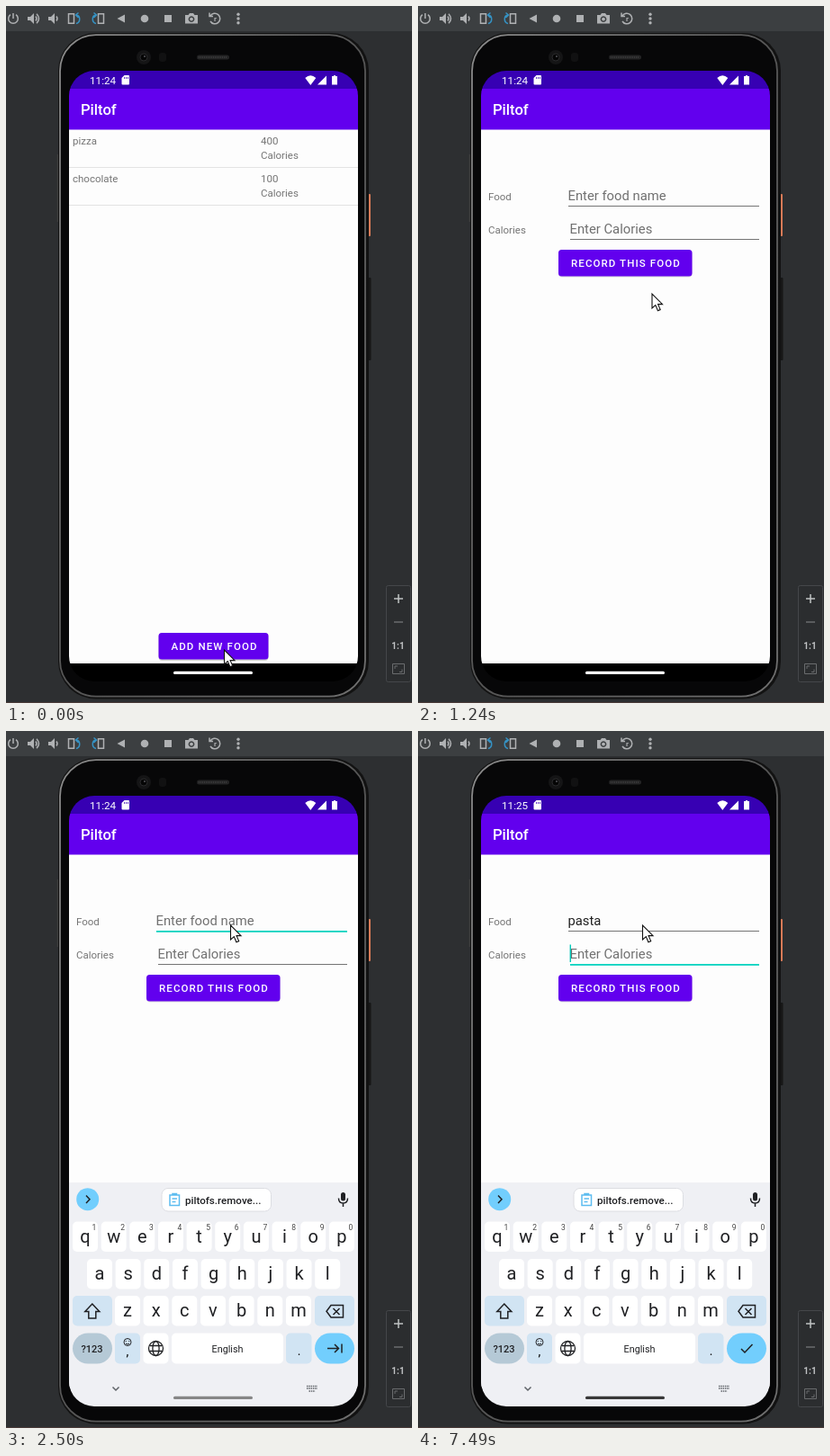
Animation, 451 px wide and 775 px high, one loop 8000 ms. Source, as an HTML page:

```html
<!DOCTYPE html>
<html lang="en">
<head>
<meta charset="utf-8">
<title>Food log</title>
<style>
html, body { margin: 0; width: 100%; height: 100%; overflow: hidden; background: #2d2f31; }
svg { display: block; width: 100vw; height: 100vh; }
text { font-family: Roboto, "Liberation Sans", sans-serif; white-space: pre; }
.body { font-size: 11.5px; fill: #757575; }
.field { font-size: 14.8px; fill: #707070; }
.btn { font-size: 11.5px; font-weight: 500; letter-spacing: 1.1px; fill: #fff; }
.key { font-size: 20px; fill: #202124; text-anchor: middle; }
.mid { text-anchor: middle; }
.line { fill: none; stroke-width: 1.5; }
</style>
</head>
<body>
<svg viewBox="0 0 451 775">
  <defs>
    <clipPath id="screen"><rect x="70" y="72" width="321" height="679" rx="28"/></clipPath>
    <clipPath id="page"><rect x="70" y="92" width="321" height="639"/></clipPath>
    <linearGradient id="rim" x2="1" y2="1">
      <stop offset="0" stop-color="#8c8c8c"/><stop offset=".5" stop-color="#555"/><stop offset="1" stop-color="#707070"/>
    </linearGradient>
    <path id="speaker" d="M-6-2h3l4-4v12l-4-4h-3z"/>
  </defs>

  <!-- emulator window -->
  <rect width="451" height="775" fill="#2d2f31"/>
  <rect width="451" height="28" fill="#3c3f41"/>
  <path d="M0 774.5h451" stroke="#4a3a38"/>
  <g fill="#afb1b3" stroke="#afb1b3" stroke-width="0">
    <path class="line" d="M5 9.7a5.3 5.3 0 1 0 6 0M8 8v6"/>
    <use href="#speaker" x="30" y="14"/>
    <path class="line" d="M33 11.5q2 2.5 0 5M34 8.7q5 5.3 0 10.6"/>
    <use href="#speaker" x="53" y="14"/>
    <path class="line" d="M56 11.5q2 2.5 0 5"/>
    <path class="line" d="M69.5 8.7h6v10.6h-6zM102.5 8.7h6v10.6h-6z"/>
    <path class="line" stroke="#3592c4" d="M78 19.5c5-1 5-9 0-9.5m2.5-2.5l-3 2.5 3 3M100 19.5c-5-1-5-9 0-9.5m-2.5-2.5l3 2.5-3 3"/>
    <path d="M132 9.5v9l-8.5-4.5zM176 10h8v8h-8z"/>
    <circle cx="154" cy="14" r="4.3"/>
    <path fill-rule="evenodd" d="M199 10h3.5l1.5-2h4l1.5 2h3.5v9.5h-14zM206 11.2a3.4 3.4 0 1 0 .01 0z"/>
    <circle cx="206" cy="14.6" r="1.9"/>
    <path class="line" d="M227 11a5.8 5.8 0 1 1 0 6M226 7.5v4h4"/>
    <text class="mid" x="232.5" y="17" font-size="8" font-weight="700">r</text>
    <circle cx="258" cy="9.3" r="1.7"/><circle cx="258" cy="14" r="1.7"/><circle cx="258" cy="18.7" r="1.7"/>
  </g>
  <rect x="422.5" y="644.5" width="27" height="107" rx="2" fill="#2b2d2f" stroke="#45474a"/>
  <path class="line" stroke="#c0c2c4" d="M431 659h10M436 654v10"/>
  <path class="line" stroke="#6a6c6e" d="M431 685h10"/>
  <text class="mid" x="435.5" y="714.5" font-size="10" font-weight="700" fill="#c0c2c4">1:1</text>
  <path fill="none" stroke="#6a6c6e" d="M429.5 731.5h13v11h-13zM432 737v-3h3M437 740.5h3v-3"/>

  <!-- phone -->
  <path d="M57.5 165v75" stroke="#3c3c3c" stroke-width="1.5"/>
  <rect x="402.5" y="209" width="2.5" height="47" rx="1" fill="#d87b58"/>
  <rect x="402.5" y="302" width="3" height="92" rx="1" fill="#171717"/>
  <rect x="58" y="30" width="345" height="740.5" rx="42" fill="#121212"/>
  <rect x="60" y="32.2" width="339" height="735.5" rx="40" fill="#070708" stroke="url(#rim)" stroke-width="1.8"/>
  <circle cx="153" cy="57" r="8" fill="#151516"/><circle cx="153" cy="57" r="4" fill="#050505" stroke="#29292b"/>
  <circle cx="154" cy="56" r="1" fill="#55555a"/>
  <rect x="170" y="52" width="8" height="10" rx="3" fill="#111112"/>
  <rect x="212" y="54.5" width="36" height="5" rx="2.5" fill="#242425"/>
  <path d="M214 57h32" stroke="#39393a" stroke-width="2" stroke-dasharray="1 1"/>

  <g clip-path="url(#screen)">
    <rect x="70" y="72" width="321" height="679" fill="#000"/>
    <rect x="70" y="72" width="321" height="20.5" fill="#3700b3"/>
    <rect x="70" y="92" width="321" height="46" fill="#6200ee"/>
    <rect x="70" y="137.5" width="321" height="593.5" fill="#fdfdfd"/>
    <text id="clock" x="93" y="87" font-size="11.7" fill="#fff"></text>
    <g fill="#fff">
      <path d="M131.5 77h4.5q1 0 1 1v8.5q0 1-1 1h-6.5q-1 0-1-1v-6.5z"/>
      <path d="M338.3 88l-6-8q6-5.500 12 0zM356 77.500v10h-10zM364 77h2v1h2v9.500h-6v-9.500h2z"/>
      <path d="M131.500 79v2M133.500 79v2M135.500 79v2" stroke="#3700b3" stroke-width=".8"/>
    </g>
    <g clip-path="url(#page)">
      <g id="list">
        <text x="83" y="121" font-size="16.6" font-weight="500" fill="#fff">Piltof</text>
        <g class="body">
          <text x="74" y="154">pizza</text><text x="283" y="154">400</text><text x="283" y="170">Calories</text>
          <text x="74" y="196">chocolate</text><text x="283" y="196">100</text><text x="283" y="212">Calories</text>
        </g>
        <path d="M70 179.500h321M70 221.500h321" stroke="#e3e3e3"/>
        <rect id="shade" x="169.500" y="698" width="122" rx="4" fill="#000" opacity=".18"/>
        <rect id="add" x="169.500" y="697" width="122" height="29.500" rx="3.500"/>
        <text class="btn" x="183.500" y="716">ADD NEW FOOD</text>
      </g>
      <g id="form">
        <text x="83" y="121" font-size="16.6" font-weight="500" fill="#fff">Piltof</text>
        <text class="body" x="78" y="216">Food</text>
        <text class="body" x="78" y="253">Calories</text>
        <text id="food" class="field" x="166.500" y="216"></text>
        <text class="field" x="168.500" y="253">Enter Calories</text>
        <rect id="line1" x="167" width="212"/>
        <rect id="line2" x="169" width="210"/>
        <rect id="compose" x="167" y="217" height="1" fill="#212121"/>
        <rect id="caret" width="1.400" height="19.500" fill="#03c9b8"/>
        <rect x="156" y="272" width="148.500" height="29.500" rx="4" fill="#000" opacity=".14"/>
        <rect x="156" y="271" width="148.500" height="29.500" rx="3.500" fill="#6200ee"/>
        <text class="btn" x="170" y="290">RECORD THIS FOOD</text>
      </g>
    </g>
    <g id="board"></g>
    <rect id="pill" x="186" y="739.800" width="88" height="3.200" rx="1.600"/>
  </g>
  <path id="mouse" d="M0 0V16L3.800 12.600 6.400 18.800 9.200 17.600 6.600 11.600H11.500Z" fill="#fff" stroke="#111" stroke-width="1.100"/>
</svg>
<script>
const $ = id => document.getElementById(id);
const set = (id, attrs) => { for (const k in attrs) $(id).setAttribute(k, attrs[k]); };
const show = (id, on) => set(id, { visibility: on ? 'visible' : 'hidden' });

// Keyboard, built in its resting position
const rect = (x, y, w, h, r, fill, extra = '') =>
  `<rect x="${x}" y="${y}" width="${w}" height="${h}" rx="${r}" fill="${fill}" ${extra}/>`;
const SOFT = '#d1e4f3', SKY = '#72cefd', INK = '#202124';
const letters = (row, x, y) => [...row].map((c, i) => {
  const cx = x + i * 31.65;
  return rect(cx - 14, y, 28, 33.5, 5, '#fff') + `<text class="key" x="${cx}" y="${y + 23}">${c}</text>` +
    (row.length == 10 ? `<text class="mid" x="${cx + 10}" y="${y + 9.5}" font-size="8.5" fill="#444">${(i + 1) % 10}</text>` : '');
}).join('');
const icon = (d, color = INK) => `<path class="line" stroke="${color}" d="${d}"/>`;

$('board').innerHTML =
  rect(70, 502, 321, 300, 0, '#eff0f4') +
  `<circle cx="90.7" cy="520.7" r="12.5" fill="${SKY}"/>` + icon('M89 516.5l4 4.2-4 4.2') +
  `<g id="chip">` + rect(173, 508.5, 121.5, 25.5, 7, '#fff', 'stroke="#dcdde2"') +
  icon('M182 516h10.5v11.5h-10.5zM185 516v-1.5h4.5v1.5M184.5 520h5.5M184.5 523.5h4', '#5cbcf0') +
  `<text x="199" y="526" font-size="11.6" font-weight="500" fill="${INK}">piltofs.remove...</text></g>` +
  rect(372, 513, 5, 9.5, 2.5, INK) + icon('M369.5 519.5q0 5.5 5 5.5t5-5.5M374.5 525v4') +
  letters('qwertyuiop', 88, 545.5) + letters('asdfghjkl', 104, 587) +
  rect(74, 628, 44, 33.5, 5, SOFT) + letters('zxcvbnm', 135, 628) + rect(343, 628, 44, 33.5, 5, SOFT) +
  icon('M95.8 637l8 8.5h-4v7.5h-8v-7.5h-4z') +
  icon('M361 638.5h13.5v13.5h-13.5l-5-6.75zM363.5 642l7 7M370.5 642l-7 7') +
  rect(74, 669.5, 44, 34, 17, '#b5c9d6') +
  `<text class="mid" x="95.5" y="691" font-size="11" font-weight="500" fill="${INK}">?123</text>` +
  rect(121, 669.5, 28, 34, 5, SOFT) + rect(152.5, 669.5, 28, 34, 5, '#fff') +
  rect(184, 669.5, 124, 34, 5, '#fff') + rect(311, 669.5, 28.5, 34, 5, SOFT) + rect(343, 669.5, 44, 34, 17, SKY) +
  `<g fill="none" stroke="${INK}"><circle cx="135" cy="679.5" r="4"/><path d="M133 681q2 2 4 0M133.2 678v1M136.8 678v1"/></g>` +
  `<text class="mid" x="135" y="695" font-size="14">,</text><text class="mid" x="325.5" y="694" font-size="14">.</text>` +
  `<g fill="none" stroke="${INK}" stroke-width="1.3"><circle cx="166.5" cy="686.5" r="8"/><ellipse cx="166.5" cy="686.5" rx="3.6" ry="8"/><path d="M159.5 683.5h14M159.5 689.5h14"/></g>` +
  `<text class="mid" x="246" y="691" font-size="10.8" fill="${INK}">English</text>` +
  `<g id="next">${icon('M357 686.5h12M365 682l4.5 4.5-4.5 4.5M373 681.5v10')}</g>` +
  `<g id="done">${icon('M359 687l4 4 8.5-9')}</g>` +
  icon('M118.5 729.5l3.5 3.5 3.5-3.5', '#5f6368') +
  `<path d="M334 728.5h12M334 731h12M336.5 734h7" stroke="#5f6368" stroke-width="1.5" stroke-dasharray="1.5 .8"/>`;

// Each track lists [start time, value...]; a value holds until the next start
const at = (track, t) => track.filter(s => s[0] <= t).pop().slice(1);
const SLIDE = [[0, 0], [460, 12], [580, 2.4], [700, .7], [850, 0]];
const MOUSE = [[0, 242.5, 716], [1000, 247, 650], [1120, 258, 460], [1240, 260, 320], [1360, 251, 245], [1510, 249.5, 221], [1660, 249.5, 216]];
const BOARD = [[0, 249, 0, 0], [1780, 190, .25, 0], [1900, 105, .55, .39], [2020, 34, .85, .75], [2140, 6, .97, .96], [2260, 0, 1, 1]]; // drop, opacity, chip scale
const PILL = [[0, 255], [2140, 225], [2260, 180], [2500, 134], [2740, 108], [2980, 86], [3280, 68], [3550, 56]];
const CARET = [[0, 0], [1660, 1], [2260, 0], [2740, 1], [3280, 0], [3820, 1], [4250, 0], [4770, 1], [5200, 0], [5760, 1], [7050, 0], [7490, 1]];
const TYPED = [[0, 0], [5760, 2], [5880, 3], [6000, 4], [6120, 5]];

function underline(id, y, active) {
  set(id, { y, height: active ? 1.8 : 1, fill: active ? '#03d3c0' : '#747474' });
}

function draw(t) {
  const onForm = t >= 460, pressed = t >= 310, second = t >= 6520;
  $('clock').textContent = t < 4370 ? '11:24' : '11:25';
  show('list', !onForm);
  show('form', onForm);
  set('add', { fill: pressed ? '#8133f1' : '#6200ee' });
  set('shade', { height: pressed ? 33 : 30 });
  set('form', { transform: `translate(${at(SLIDE, t)[0]} 0)` });

  const [n] = at(TYPED, t), food = $('food');
  food.textContent = n ? 'pasta'.slice(0, n) : 'Enter food name';
  food.style.fill = n ? '#212121' : '';
  const composed = t >= 6270 ? n : n - 1;
  set('compose', { width: n && !second ? food.getSubStringLength(0, composed) : 0 });
  underline('line1', 222, t >= 1660 && !second);
  underline('line2', 259, second);
  show('caret', onForm && at(CARET, t)[0]);
  set('caret', second ? { x: 168.6, y: 237.5 } : { x: 166.8 + (n && food.getComputedTextLength()), y: 200.5 });

  const [drop, alpha, scale] = at(BOARD, t), [grey] = at(PILL, t);
  set('board', { transform: `translate(0 ${drop})`, opacity: alpha });
  set('chip', { transform: `translate(233.7 521.2) scale(${scale}) translate(-233.7 -521.2)` });
  show('next', !second);
  show('done', second);
  set('pill', { fill: `rgb(${grey},${grey},${grey})` });
  set('mouse', { transform: `translate(${at(MOUSE, t).join(' ')})` });
}

const start = performance.now();
function tick() {
  draw((performance.now() - start) % 8000);
  requestAnimationFrame(tick);
}
tick();
</script>
</body>
</html>
```
